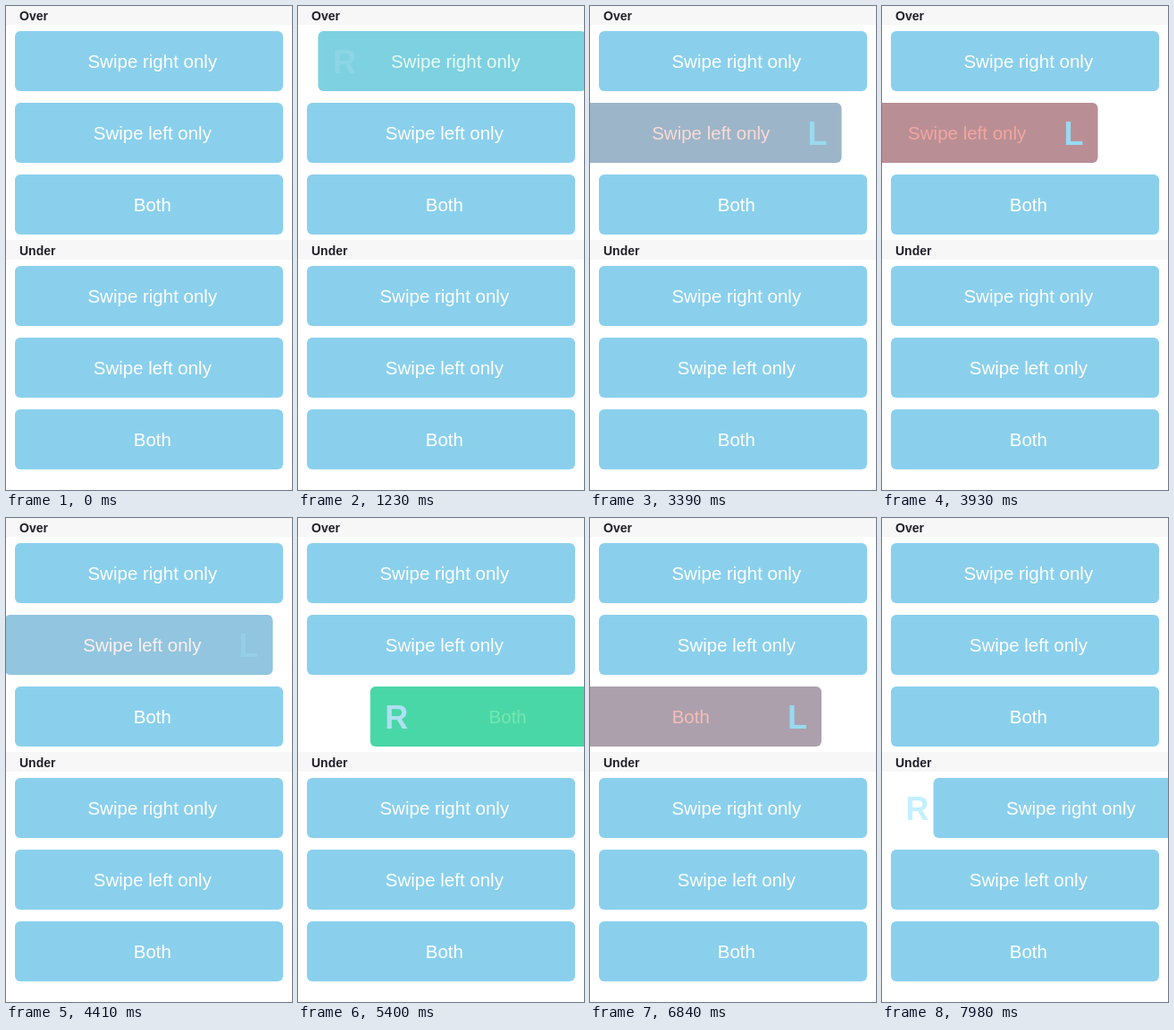
Animation, 320 px wide and 540 px high, one loop 8 s. Source, as an HTML page with a canvas:

```html
<!DOCTYPE html>
<html lang="en">
<head>
<meta charset="utf-8">
<title>Swipe rows</title>
<style>
html, body { margin: 0; width: 100%; height: 100%; overflow: hidden; background: #fff; }
canvas { display: block; width: 320px; height: 540px; }
</style>
</head>
<body>
<canvas id="stage" width="320" height="540"></canvas>
<script>
const ctx = document.getElementById('stage').getContext('2d');
const LOOP = 8000, TICK = 30;
const FONT = '"Liberation Sans", Arial, sans-serif';
const LEFT = 10, WIDTH = 300, HEIGHT = 67, PITCH = 80;
const LABELS = ['Swipe right only', 'Swipe left only', 'Both'];
const SECTIONS = [
  { title: 'Over', y: 0, h: 21, firstRow: 28 },
  { title: 'Under', y: 261, h: 22, firstRow: 290 }
];

// A drag pulls a row from "grab" out to "peak", then lets it go back in "fall" ms
const drags = [
  { row: 0, start: 1230, end: 2430, grab: 12.5, peak: 81, fall: 300 },
  { row: 1, start: 3240, end: 4620, grab: 0, peak: -72, fall: 802 },
  { row: 2, start: 5040, end: 5850, grab: 10, peak: 78, fall: 300 },
  { row: 2, start: 6270, end: 7020, grab: -26, peak: -78, fall: 300 },
  { row: 3, start: 7770, end: 8653, grab: 10, peak: 80, fall: 300 }
];

function dragOffset({ start, end, grab, peak, fall }, t) {
  if (t < start || t >= end) return 0;
  const top = end - fall;
  if (t < top) return grab + (peak - grab) * Math.sin(Math.PI / 2 * (t - start) / (top - start));
  return peak * (1 + Math.cos(Math.PI * (t - top) / fall)) / 2;
}

function write(text, x, y, font, color, align) {
  ctx.font = font + ' ' + FONT;
  ctx.fillStyle = color;
  ctx.textAlign = align;
  ctx.fillText(text, x, y);
}

function card(x, y, color) {
  ctx.fillStyle = color;
  ctx.beginPath();
  ctx.roundRect(x, y, WIDTH, HEIGHT, 6);
  ctx.fill();
}

function header({ title, y, h }) {
  ctx.fillStyle = '#f7f7f7';
  ctx.fillRect(0, y, 320, h);
  write(title, 15, y + h - 5.5, 'bold 14px', '#222029', 'left');
}

function letter(x, y, right, color, alpha) {
  ctx.globalAlpha = Math.min(1, alpha);
  if (right) write('R', x + 16.5, y + 47, 'bold 36px', color, 'left');
  else write('L', x + WIDTH - 16, y + 47, 'bold 36px', color, 'right');
  ctx.globalAlpha = 1;
}

function drawRow(text, y, offset, under) {
  const x = LEFT + offset, right = offset > 0, dist = Math.abs(offset);
  if (dist && under) letter(LEFT, y, right, '#73dcff', dist / 110);
  card(x, y, '#8ad0ed');
  write(text, x + 153.8, y + 41.2, '20.5px', '#fff', 'center');
  if (!dist || under) return;
  ctx.globalAlpha = dist / (right ? 110 : 138);
  card(x, y, right ? '#28dc82' : '#e74c3c');
  letter(x, y, right, right ? '#aee0f2' : '#98daf0', dist / (right ? 40 : 26));
}

function draw(now) {
  const t = Math.floor(now % LOOP / TICK) * TICK;
  ctx.fillStyle = '#fff';
  ctx.fillRect(0, 0, 320, 540);
  SECTIONS.forEach((section, s) => {
    header(section);
    LABELS.forEach((text, i) => {
      const row = s * LABELS.length + i;
      const offset = drags.reduce((sum, d) => d.row === row ? sum + dragOffset(d, t) : sum, 0);
      drawRow(text, section.firstRow + i * PITCH, offset, s === 1);
    });
  });
}

let start;
function frame(now) {
  start ??= now;
  draw(now - start);
  requestAnimationFrame(frame);
}
draw(0);
requestAnimationFrame(frame);
</script>
</body>
</html>
```
